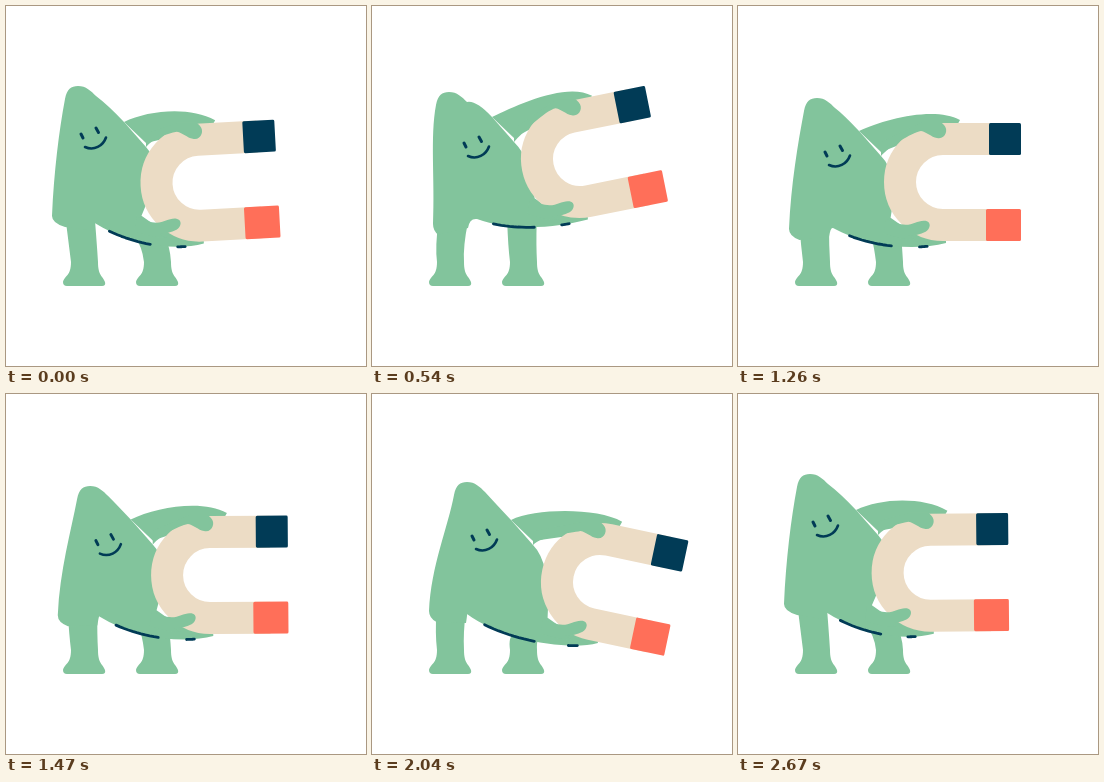
Animation, 360 px wide and 360 px high, one loop 2.7 s. Source, as an HTML page with a canvas:

```html
<!DOCTYPE html>
<html lang="en">
<head>
<meta charset="utf-8">
<style>
html, body { margin: 0; width: 100%; height: 100%; overflow: hidden; background: #fff; }
canvas { display: block; width: 360px; height: 360px; }
</style>
</head>
<body>
<canvas id="stage"></canvas>
<script>
const LOOP = 2700, STEP = 30;
const GREEN = '#82c49c', CREAM = '#ecdcc5', NAVY = '#013b56', RED = '#ff6f59';

const canvas = document.getElementById('stage');
const ctx = canvas.getContext('2d');
const ratio = window.devicePixelRatio || 1;
canvas.width = canvas.height = 360 * ratio;

// time, head top, back corner, shoulder, crotch, smile start, magnet centre, magnet degrees
const KEYS = [
  [0,    72, 80,  46, 210,  118, 116,  87, 216,  79, 141,  193.5, 176.7,  -3.1],
  [240,  73, 82,  50, 213,  118, 113,  93, 215,  85, 144,  199, 165,  -13],
  [540,  77, 86,  61, 218,  120, 111, 105, 213,  96, 150,  208, 153,  -11.4],
  [870,  77, 90,  56, 221,  121, 118, 102, 217,  94, 154,  209.4, 159.6, -4.3],
  [1020, 82, 90,  56, 222,  126, 119, 101, 219,  97, 155,  230, 158,  -15],
  [1260, 79, 92,  51, 223,  121, 125,  95, 222,  91, 159,  205, 176,  0],
  [1710, 91, 91,  54, 219,  131, 125,  93, 222,  99, 159,  210.2, 184.1, -1.7],
  [2040, 95, 88,  57, 217,  139, 126,  95, 220, 104, 155,  228, 188,  12],
  [2340, 91, 83,  55, 213,  138, 128,  93, 217,  99, 149,  208.7, 196,  27.4],
  [2670, 72, 80,  46, 210,  118, 116,  86, 217,  79, 141,  192.6, 178.7, -0.5]
];

function keyAt(i) {
  const n = KEYS.length, turn = Math.floor(i / n);
  const key = KEYS[i - turn * n].slice();
  key[0] += turn * LOOP;
  return key;
}

// Smooth periodic spline through the keys
function poseAt(time) {
  let i = KEYS.length - 1;
  while (KEYS[i][0] > time) i--;
  const [before, a, b, after] = [i - 1, i, i + 1, i + 2].map(keyAt);
  const span = b[0] - a[0], u = (time - a[0]) / span;
  const v = a.map((start, k) => {
    const end = b[k];
    const m0 = (end - before[k]) / (b[0] - before[0]) * span;
    const m1 = (after[k] - start) / (after[0] - a[0]) * span;
    return start + u * m0
      + u * u * (3 * (end - start) - 2 * m0 - m1)
      + u * u * u * (2 * (start - end) + m0 + m1);
  });
  const point = k => ({ x: v[k], y: v[k + 1] });
  return {
    tip: point(1), back: point(3), shoulder: point(5), crotch: point(7),
    smile: point(9), magnet: point(11), angle: v[13] * Math.PI / 180
  };
}

const offset = (p, x, y) => ({ x: p.x + x, y: p.y + y });

function orbit(p, x, y, angle) {
  const c = Math.cos(angle), s = Math.sin(angle);
  return offset(p, x * c - y * s, x * s + y * c);
}

function shape(origin, color, trace) {
  ctx.save();
  ctx.translate(origin.x, origin.y);
  ctx.beginPath();
  trace();
  ctx.closePath();
  ctx.fillStyle = color;
  ctx.fill();
  ctx.restore();
}

const PAGE = { x: 0, y: 0 };

function leg(topX, topY, footX) {
  shape(PAGE, GREEN, () => {
    ctx.moveTo(topX, topY);
    ctx.quadraticCurveTo(footX + 6, 240, footX + 8, 256);
    ctx.bezierCurveTo(footX + 8, 270, footX + 2, 269, footX, 276);
    ctx.quadraticCurveTo(footX, 280, footX + 4, 280);
    ctx.lineTo(footX + 39, 280);
    ctx.quadraticCurveTo(footX + 43, 280, footX + 42, 276);
    ctx.bezierCurveTo(footX + 40, 270, footX + 35, 270, footX + 35, 256);
    ctx.quadraticCurveTo(footX + 34, 240, topX + 29.5, topY);
  });
}

function bellyCurve(pose) {
  const start = pose.crotch;
  const end = orbit(pose.magnet, 3, 61, pose.angle * 0.4);
  return [
    start,
    offset(start, 35, 13 + 0.45 * Math.max(0, end.y - start.y)),
    offset(end, -30, 8),
    end
  ];
}

function bezierPoint(p, t) {
  const s = 1 - t;
  const mix = axis => s * s * s * p[0][axis] + 3 * s * s * t * p[1][axis]
    + 3 * s * t * t * p[2][axis] + t * t * t * p[3][axis];
  return { x: mix('x'), y: mix('y') };
}

function torso(pose, arm, hand) {
  const { tip, back, shoulder, crotch, magnet } = pose;
  const belly = bellyCurve(pose);
  const legX = back.x / 2 + 36;
  const armpit = offset(shoulder, 22, 25);
  const wrist = offset(hand, -39, -8);

  shape(PAGE, GREEN, () => {
    ctx.moveTo(tip.x, tip.y);
    ctx.bezierCurveTo(tip.x + 8, tip.y, tip.x + 13, tip.y + 5, tip.x + 18, tip.y + 10);
    ctx.quadraticCurveTo(shoulder.x - 16, shoulder.y - 17, shoulder.x, shoulder.y);
    ctx.lineTo(armpit.x, armpit.y);
    ctx.quadraticCurveTo(armpit.x + 18, armpit.y + 18, wrist.x + 2, wrist.y);
    ctx.lineTo(hand.x - 20, hand.y + 4);
    ctx.lineTo(belly[3].x, belly[3].y - 8);
    ctx.lineTo(belly[3].x, belly[3].y);
    ctx.bezierCurveTo(belly[2].x, belly[2].y, belly[1].x, belly[1].y, crotch.x, crotch.y);
    ctx.quadraticCurveTo(legX + 31, crotch.y - 1, legX + 29.5, crotch.y + 9);
    ctx.lineTo(legX, back.y + 11);
    ctx.quadraticCurveTo(back.x, back.y + 7, back.x, back.y);
    ctx.bezierCurveTo(back.x + 2, back.y - 45, tip.x - 19, tip.y + 45, tip.x - 13, tip.y + 13);
    ctx.bezierCurveTo(tip.x - 11, tip.y + 3, tip.x - 7, tip.y, tip.x, tip.y);
  });

  const end = orbit(magnet, 17, -62, pose.angle * 0.4);
  shape(PAGE, GREEN, () => {
    ctx.moveTo(shoulder.x, shoulder.y);
    ctx.bezierCurveTo(shoulder.x + 25, shoulder.y - 12, end.x - 25, end.y - 14, end.x, end.y);
    ctx.lineTo(end.x - 5, end.y + 9);
    ctx.lineTo(arm.x - 10, arm.y - 2);
    ctx.lineTo(armpit.x, armpit.y - 4);
  });
}

function drawMagnet({ magnet, angle }) {
  ctx.save();
  ctx.translate(magnet.x, magnet.y);
  ctx.rotate(angle);
  ctx.beginPath();
  ctx.moveTo(60, -43);
  ctx.lineTo(0, -43);
  ctx.arc(0, 0, 43, -Math.PI / 2, Math.PI / 2, true);
  ctx.lineTo(60, 43);
  ctx.lineWidth = 32;
  ctx.strokeStyle = CREAM;
  ctx.stroke();
  const pole = (color, x, y) => {
    ctx.fillStyle = color;
    ctx.beginPath();
    ctx.roundRect(x, y, 78 - x, 32, 1.5);
    ctx.fill();
  };
  pole(NAVY, 46, -59);
  pole(RED, 43, 27);
  ctx.restore();
}

function upperHand(tip, shoulder) {
  const armpit = offset(shoulder, 22 - tip.x, 25 - tip.y);
  shape(tip, GREEN, () => {
    ctx.moveTo(armpit.x, armpit.y);
    ctx.bezierCurveTo(armpit.x + 8, armpit.y - 9, -29, -2, -19, -4);
    ctx.bezierCurveTo(-13, -3, -9, 2, -3, 3);
    ctx.bezierCurveTo(5, 5, 9, -5, 4, -10);
    ctx.lineTo(1, -13);
    ctx.lineTo(-18, -13);
    ctx.lineTo(armpit.x, armpit.y - 14);
  });
}

function lowerHand(tip) {
  shape(tip, GREEN, () => {
    ctx.moveTo(-42, -8);
    ctx.quadraticCurveTo(-31, -1, -22, -1);
    ctx.bezierCurveTo(-14, -1, -9, -6, -2, -5);
    ctx.bezierCurveTo(4, -4, 3, 3, -2, 6);
    ctx.quadraticCurveTo(-10, 10, -19, 10);
    ctx.quadraticCurveTo(-15, 13, -10, 14);
    ctx.lineTo(-26, 13);
    ctx.lineTo(-44, 8);
  });
}

function bellyMark(curve, from, to) {
  ctx.beginPath();
  for (let i = 0; i <= 10; i++) {
    const p = bezierPoint(curve, from + (to - from) * i / 10);
    ctx.lineTo(p.x, p.y);
  }
  ctx.stroke();
}

function face({ x, y }) {
  ctx.save();
  ctx.translate(x, y);
  ctx.lineWidth = 3;
  ctx.beginPath();
  ctx.moveTo(-4, -13);
  ctx.lineTo(-2, -9);
  ctx.moveTo(11, -19);
  ctx.lineTo(13.5, -14.5);
  ctx.stroke();
  ctx.lineWidth = 2.6;
  ctx.beginPath();
  ctx.moveTo(0, 0);
  ctx.bezierCurveTo(9, 4, 18, -1, 21, -9.5);
  ctx.stroke();
  ctx.restore();
}

function draw(time) {
  const pose = poseAt(time);
  const { magnet, crotch, back, shoulder } = pose;
  const bend = crotch.x - 87;
  const arm = orbit(magnet, -3, -47, pose.angle * 0.25);
  const hand = offset(magnet, bend * 0.7 - 21, 41 + bend * 0.35);
  const belly = bellyCurve(pose);

  ctx.setTransform(ratio, 0, 0, ratio, 0, 0);
  ctx.fillStyle = '#fff';
  ctx.fillRect(0, 0, 360, 360);

  leg(back.x / 2 + 36, back.y - 2, 57);
  leg(magnet.x * 0.4 + 52, bezierPoint(belly, 0.5).y - 6, 130);
  torso(pose, arm, hand);

  ctx.strokeStyle = NAVY;
  ctx.lineCap = ctx.lineJoin = 'round';
  ctx.lineWidth = 2.8;
  bellyMark(belly, 0.15, 0.5);
  bellyMark(belly, 0.74, 0.81);

  ctx.lineCap = 'butt';
  drawMagnet(pose);
  upperHand(arm, shoulder);
  lowerHand(hand);

  ctx.lineCap = 'round';
  ctx.strokeStyle = NAVY;
  face(pose.smile);
}

function frame() {
  const time = performance.now() % LOOP;
  draw(Math.floor(time / STEP) * STEP);
  requestAnimationFrame(frame);
}
frame();
</script>
</body>
</html>
```
